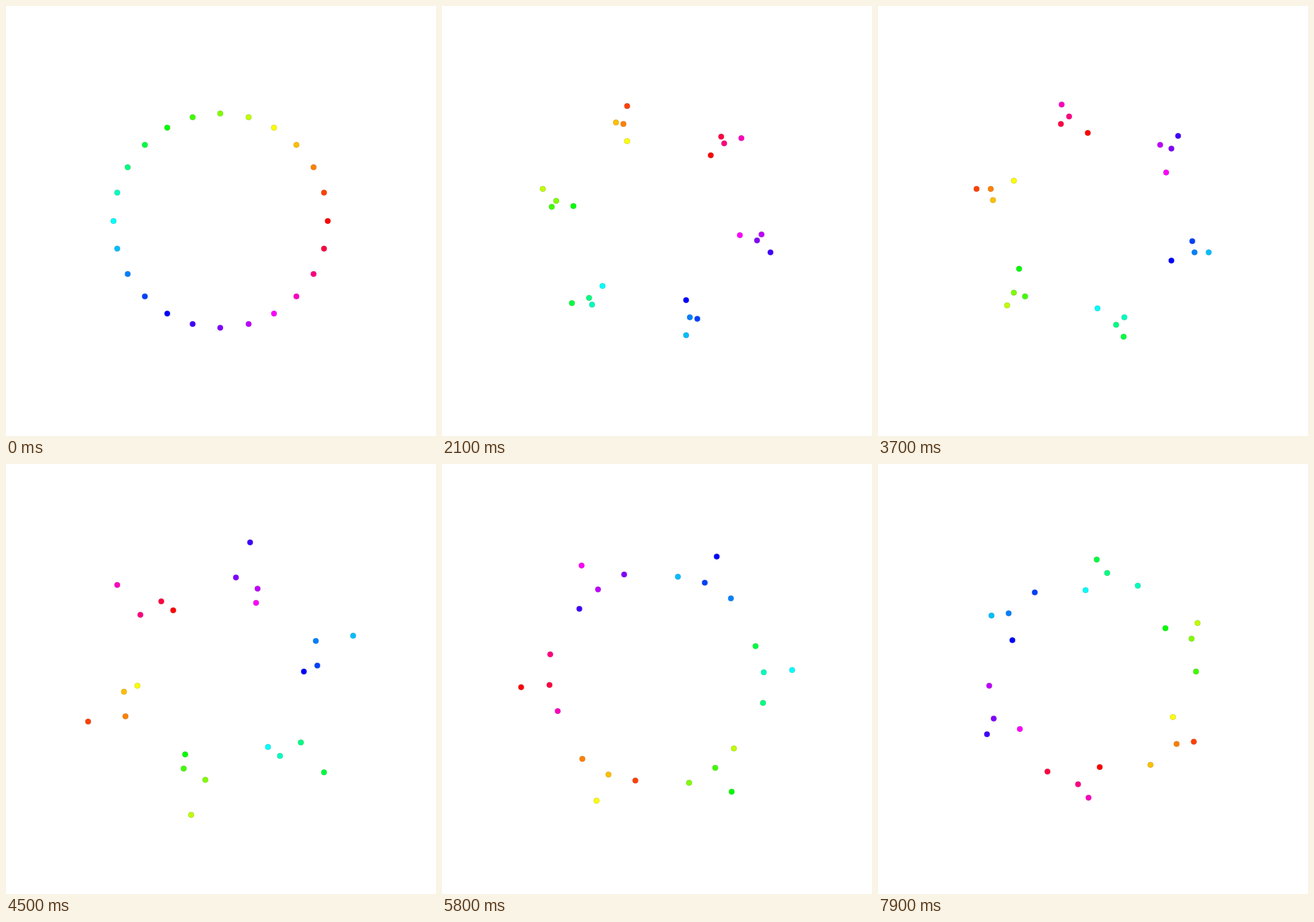
These frames come from a looping animation (576x576 px, 8000 ms). An HTML page with a canvas:

```html
<!DOCTYPE html>
<html lang="en">
<head>
<meta charset="utf-8">
<title>Orbiting ring of dots</title>
<style>
  html, body { margin: 0; width: 100%; height: 100%; overflow: hidden; background: #fff; }
  canvas { display: block; }
</style>
</head>
<body>
<canvas width="576" height="576"></canvas>
<script>
const ctx = document.querySelector('canvas').getContext('2d');
const LOOP = 8000, STEP = 100, DOTS = 24, CLUSTER = 4;
const CX = 287.49, CY = 287.5, RING = 143.6;

// Key poses of one cluster; the other five are the same, turned by 60 degrees each
const poses = [
  { t: 0, angle: [0, 15, 30, 45], radius: Array(CLUSTER).fill(RING) },
  { t: 1.2, angle: [32.6, 69.7, 88.8, 74], radius: [103.2, 179.3, 128.3, 140.2] },
  { t: 3, angle: [69.9, 137.4, 128, 151.5], radius: [130.5, 136.6, 148.1, 142.5] },
  { t: 4.5, angle: [124.9, 197.9, 201.5, 187.5], radius: [111.8, 186.7, 137.2, 130.6] },
  { t: 5.8, angle: [183.7, 258.1, 227.2, 243.3], radius: [182, 139.5, 146.3, 143.5] },
  { t: 6.6, angle: [226.7, 265.6, 265.3, 272], radius: [154.9, 108.9, 173.2, 131.6] },
  { t: 7.9, angle: [274.6, 328, 322.1, 304], radius: [118.9, 159.7, 142.8, 138.8] },
];

// Smooth curve through the key poses, for one property of one dot
function sample(prop, dot, t) {
  const last = poses.length - 1;
  const slope = i => (poses[i + 1][prop][dot] - poses[i][prop][dot]) / (poses[i + 1].t - poses[i].t);
  const tangent = i => {
    if (i === 0) return slope(0);
    if (i === last) return slope(last - 1);
    const before = poses[i].t - poses[i - 1].t, after = poses[i + 1].t - poses[i].t;
    return (slope(i - 1) * after + slope(i) * before) / (before + after);
  };
  let i = 0;
  while (i < last - 1 && t >= poses[i + 1].t) i++;
  const a = poses[i], b = poses[i + 1], span = b.t - a.t;
  const u = (t - a.t) / span, v = 1 - u;
  return v * v * (1 + 2 * u) * a[prop][dot] + u * u * (1 + 2 * v) * b[prop][dot]
    + u * v * span * (v * tangent(i) - u * tangent(i + 1));
}

function draw(t) {
  ctx.clearRect(0, 0, 576, 576);
  ctx.lineWidth = 0.5;
  ctx.strokeStyle = 'rgba(0, 0, 0, 0.25)';
  for (let i = 0; i < DOTS; i++) {
    const dot = i % CLUSTER, turn = 60 * Math.floor(i / CLUSTER);
    const angle = (sample('angle', dot, t) + turn) * Math.PI / 180;
    const radius = sample('radius', dot, t);
    const x = Math.round(CX + radius * Math.cos(angle));
    const y = Math.round(CY - radius * Math.sin(angle));
    ctx.beginPath();
    ctx.arc(x, y, 3.75, 0, 2 * Math.PI);
    ctx.fillStyle = `hsl(${i * 360 / DOTS}, 100%, 50%)`;
    ctx.fill();
    ctx.stroke();
  }
}

const start = performance.now();
function tick() {
  const elapsed = (performance.now() - start) % LOOP;
  draw(Math.floor(elapsed / STEP) * STEP / 1000);
  requestAnimationFrame(tick);
}
tick();
</script>
</body>
</html>
```
